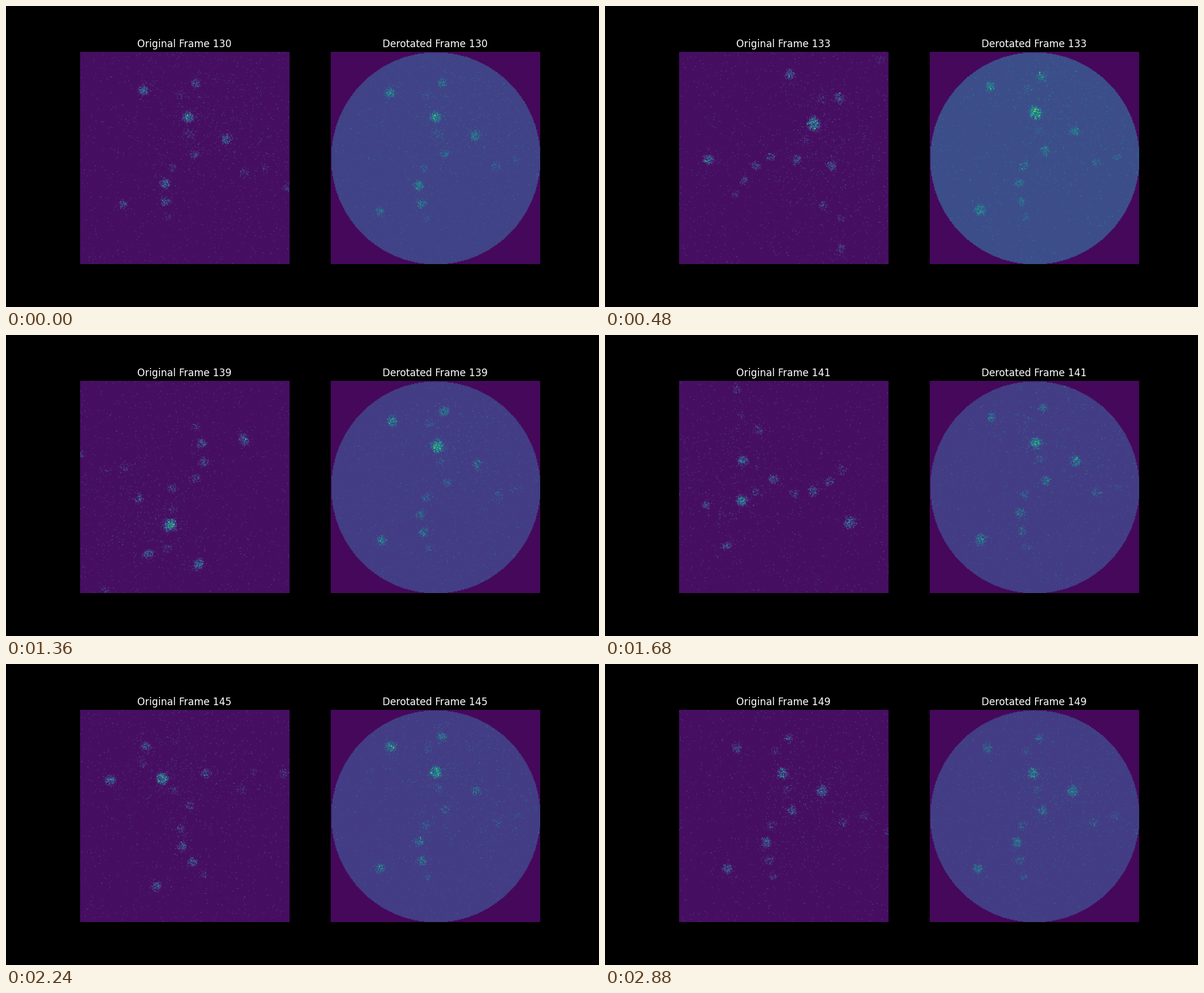
A matplotlib script for the animation above (2960 ms loop, 1008 px wide and 512 px high).

```python
import matplotlib.pyplot as plt
import numpy as np
from matplotlib.animation import FuncAnimation

TICKS, TICK_MS, SCANS, FIRST = 37, 80, 20, 130
SIZE, WIDTH, HEIGHT = 256, 355.1, 360.8
FLOOR, CORNER = .038, .02

# Pace of the full turn: scan time -> fraction of the eased rotation
PACE_TIME = [0, 6.5, 9.5, 13.5, 17.5, 19.5]
PACE = [.05, .354, .524, .735, .916, 1]

# x, y from the centre and brightness of each cell
CELLS = [
    (0, -69, .65), (67, -39, .38), (11, -128, .30), (-77, -111, .38),
    (16, -7, .24), (-28, 47, .32), (-94, 91, .38), (-23, 77, .25),
    (-19, 18, .16), (103, 14, .14), (-13, -107, .10), (6, -41, .10),
    (138, 4, .08), (-16, 104, .10), (179, 30, .14), (38, -217, .14),
]
PHASES = np.random.default_rng(4).uniform(0, 2 * np.pi, len(CELLS))

rows, cols = np.mgrid[:SIZE, :SIZE]
X = ((cols + .5) / SIZE - .5) * WIDTH
Y = ((rows + .5) / SIZE - .5) * HEIGHT
INSIDE = np.hypot(cols - 128, rows - 128) < 127.8


def angle_at(scan, y):
    """Stage angle while the row at height y is being read."""
    u = np.interp(scan + np.clip(y / HEIGHT + .5, 0, 1), PACE_TIME, PACE)
    return 2 * np.pi * u * u * (3 - 2 * u)


def disc_level(scan):
    return .18 + .06 * np.exp(-((scan - 2.6) / 2.5)**2)


def raw_scan(scan):
    """Photon image of the turning sample, one angle per row."""
    rng = np.random.default_rng(FIRST + scan)
    a = angle_at(scan, Y)
    u = X * np.cos(a) + Y * np.sin(a)
    v = Y * np.cos(a) - X * np.sin(a)

    # The tissue sways, most strongly in its upper part.
    u -= 3.6 * np.sin(np.pi * scan / 16)
    v += 5 * (1 - np.cos(2 * np.pi * scan / 8.6)) * (.7 - .004 * v)

    rate = .012 + .025 * np.exp(-((u - 60)**2 + (v + 60)**2) / 105**2)
    for (x, y, level), phase in zip(CELLS, PHASES):
        level *= 1 + .3 * np.sin(phase + .9 * scan)
        dist = np.hypot(u - x, v - y) / (6.5 + 4 * level)
        rate += 4 * level * (np.exp(-dist**4) + .03 * np.exp(-(dist / 2)**2))

    photons = rng.poisson(rate) * rng.uniform(.05, .18, rate.shape)
    grain = rng.normal(0, .004, rate.shape)
    return np.clip(FLOOR + grain + photons, 0, 1)


def derotated(raw, scan):
    """Find the row that recorded each point, then sample it there."""
    y = np.zeros_like(Y)
    for _ in range(8):
        a = angle_at(scan, y)
        y = X * np.sin(a) + Y * np.cos(a)
    x = X * np.cos(a) - Y * np.sin(a)
    i = np.clip((y / HEIGHT + .5) * SIZE, 0, SIZE - 1).astype(int)
    j = np.clip((x / WIDTH + .5) * SIZE, 0, SIZE - 1).astype(int)
    signal = disc_level(scan) + .85 * (raw[i, j] - FLOOR)
    return np.where(INSIDE, np.clip(signal, 0, 1), CORNER)


plt.style.use("dark_background")
plt.rcParams["font.family"] = "DejaVu Sans"
fig, axes = plt.subplots(1, 2, figsize=(10.08, 5.12), dpi=100)
images = []
for ax in axes:
    images.append(ax.imshow(np.zeros((SIZE, SIZE)), cmap="viridis",
                            vmin=0, vmax=1, aspect="auto"))
    ax.set_box_aspect(HEIGHT / WIDTH)
    ax.axis("off")


def update(tick):
    scan = tick * SCANS // TICKS
    raw = raw_scan(scan)
    panels = zip(axes, images, ("Original", "Derotated"),
                 (raw, derotated(raw, scan)))
    for ax, image, name, data in panels:
        image.set_data(data)
        ax.set_title(f"{name} Frame {FIRST + scan}", fontsize=12.1)
    return images


anim = FuncAnimation(fig, update, frames=TICKS, interval=TICK_MS,
                     repeat=True, repeat_delay=0, blit=False)
plt.show()
```
